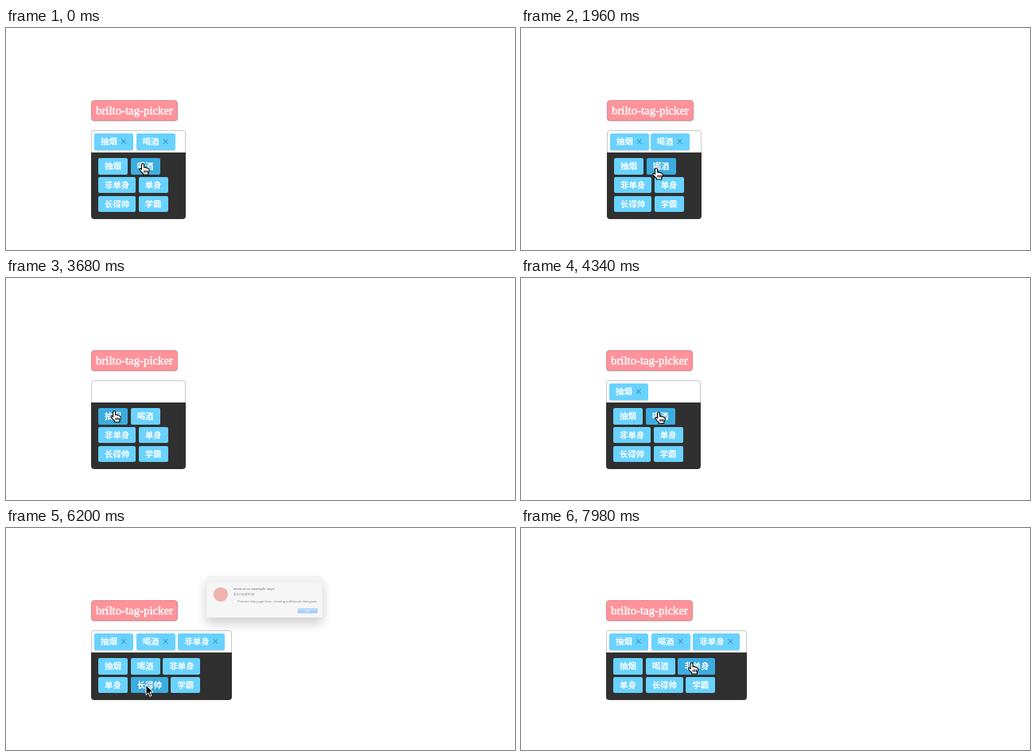
Animation, 640 px wide and 280 px high, one loop 8 s. Source, as an HTML page:

```html
<!DOCTYPE html>
<html lang="zh">
<head>
<meta charset="utf-8">
<title>Tag picker</title>
<style>
  * { box-sizing: border-box; }
  html, body { margin: 0; width: 100%; height: 100%; overflow: hidden; background: #fff; }
  #stage { position: relative; width: 640px; height: 280px; overflow: hidden; }
  #widget, #dialog, #pointer, #dialog > * { position: absolute; }
  #widget { left: 107px; top: 91px; }

  #heading {
    width: 109px; height: 26px; border: 1px solid #d98a92; border-radius: 4px;
    background: #ff929a; box-shadow: 0 1px 1px rgba(0, 0, 0, .2);
    color: #fff; font: 14.8px/25.5px "Liberation Serif", serif;
    -webkit-text-stroke: .45px #fff; text-align: center; white-space: nowrap;
  }
  #field {
    display: flex; gap: 3.7px; height: 29px; margin-top: 12px; padding: 3px;
    border: 1px solid #c9c9c9; border-radius: 3px 3px 0 0; background: #fff;
  }
  #menu {
    display: flex; flex-wrap: wrap; align-content: flex-start; gap: 3.2px 3.7px;
    margin-top: -1px; padding: 7.2px 9px 8.6px; border-radius: 0 0 4px 4px; background: #303030;
  }
  .chip {
    position: relative; height: 20.5px; padding-left: 8px; border-radius: 2px;
    background: #69d2ff; color: #fff; white-space: nowrap;
    font: 700 10.4px/19.6px "Noto Sans CJK SC", "Noto Sans CJK", sans-serif;
  }
  #field .chip { box-shadow: 0 1px 1px rgba(0, 0, 0, .15); }
  .chip.hot { background: #3cacdf; }
  .chip i {
    position: absolute; right: 8px; top: 0; color: #3b9dc8;
    font: 14px/20px "Liberation Sans", sans-serif;
  }
  .chip.hot i { color: #23607c; }

  #dialog {
    left: 140px; top: 22px; width: 370px; height: 131px; border-radius: 4px;
    background: #ececec;
    box-shadow: 0 0 1px rgba(0, 0, 0, .5), 0 17px 36px rgba(30, 8, 16, .5);
    color: #000; font: 10.4px/14px "Open Sans", sans-serif; white-space: nowrap;
  }
  #bar {
    left: 0; top: 0; width: 100%; height: 18.5px; border-radius: 4px 4px 0 0;
    border-bottom: 1px solid #c2bec1; background: linear-gradient(#ece7ea, #dcd7da);
  }
  #badge { left: 22px; top: 33px; width: 46px; height: 46px; border-radius: 50%; background: #dd4b3e; }
  #site { left: 85px; top: 31px; font-size: 10.8px; font-weight: 700; }
  #limit { left: 85px; top: 48.5px; font: 9px/14px "Noto Sans CJK TC", "Noto Sans CJK", sans-serif; }
  #box {
    left: 85px; top: 73px; width: 11px; height: 11px;
    border: 1px solid #b5b5b5; border-radius: 2px; background: #fff;
  }
  #prevent { left: 99.5px; top: 71.5px; -webkit-text-stroke: .15px #000; }
  #ok {
    left: 291px; top: 99.5px; width: 63.5px; height: 16.8px; border-radius: 3px;
    background: linear-gradient(#6bb5fb, #157efb); color: #fff; line-height: 16px; text-align: center;
  }
  #pointer { left: 0; top: 0; overflow: visible; }
</style>
</head>
<body>
<div id="stage">
  <div id="widget">
    <div id="heading">brilto-tag-picker</div>
    <div id="panel">
      <div id="field"></div>
      <div id="menu"></div>
    </div>
  </div>
  <div id="dialog">
    <div id="bar"></div>
    <div id="badge"></div>
    <div id="site">www.orvo.example says:</div>
    <div id="limit">最多只能選擇3個</div>
    <div id="box"></div>
    <div id="prevent">Prevent this page from creating additional dialogues.</div>
    <div id="ok">OK</div>
  </div>
  <svg id="pointer" width="16" height="18" stroke-linejoin="round">
    <path id="hand" fill="#fff" stroke="#000" stroke-width="1.1"
      d="M-1.5 1.5Q-1.5 0 0 0Q1.5 0 1.5 1.5V5Q3.5 4 4 5.5Q6 4.8 6.3 6.3Q8 6 8.2 8Q8.3 10.5 6.8 12V14H.3V12.5Q-2 10.5-4 8Q-4.5 6-2.8 6.2L-1.5 7.5ZM2 8.5V11.5M4 8.5V11.5M6 8.5V11.5"/>
    <path id="arrow" fill="#000" stroke="#fff" stroke-width="1"
      d="M0 0V12.5L2.9 9.8 4.9 14.3 6.9 13.4 5 9H9Z"/>
  </svg>
</div>
<script>
const LOOP = 8000;
const labels = ['抽烟', '喝酒', '非单身', '单身', '长得帅', '学霸'];
const $ = id => document.getElementById(id);
const clamp = v => Math.min(1, Math.max(0, v));
const within = (t, from, to) => t >= from && t < to;
const progress = (t, from, to) => clamp((t - from) / (to - from));

// Pointer tip: time, x, y
const path = [
  [0, 172, 171], [1000, 172, 171], [1700, 170, 177], [2300, 170, 177],
  [2750, 149, 142], [3300, 149, 142], [3800, 134, 172], [3950, 134, 172],
  [4250, 173, 169.5], [4450, 173, 169.5], [5000, 140, 192], [5250, 140, 192],
  [5800, 176, 198], [6300, 176, 198], [6850, 464.5, 122], [7130, 464.5, 122],
  [7850, 214.5, 170], [LOOP, 214.5, 170]
];

// Periods in which each tag is selected
const selected = [
  [[0, 3000], [3920, LOOP]],
  [[0, 3280], [4420, LOOP]],
  [[5200, LOOP]]
];

function addChip(parent, label, extra, close) {
  const chip = document.createElement('div');
  chip.className = 'chip';
  chip.textContent = label;
  chip.style.width = extra + label.length * 10 + 'px';
  if (close) chip.append(Object.assign(document.createElement('i'), { textContent: '×' }));
  parent.append(chip);
  return chip;
}

const tags = labels.slice(0, 3).map(s => addChip($('field'), s, 29, true));
const options = labels.map(s => addChip($('menu'), s, 17, false));
const chips = [...tags, ...options];

function pointerAt(t) {
  const i = path.findIndex(p => p[0] > t);
  const [t0, x0, y0] = path[i - 1], [t1, x1, y1] = path[i];
  const u = progress(t, t0, t1), e = u * u * (3 - 2 * u);
  return [x0 + (x1 - x0) * e, y0 + (y1 - y0) * e];
}

function chipAt(x, y) {
  return chips.find(chip => {
    const r = chip.getBoundingClientRect();
    return x >= r.left && x < r.right && y >= r.top && y < r.bottom;
  });
}

function render(t) {
  tags.forEach((tag, i) => {
    tag.style.display = selected[i].some(([a, b]) => within(t, a, b)) ? '' : 'none';
  });
  const wide = within(t, 5200, LOOP);
  $('panel').style.width = (wide ? 177 : 119) + 'px';
  $('widget').style.transform = within(t, 1060, 3500) ? 'translateX(1px)' : '';

  // Choosing a tag twice shakes it
  const shake = within(t, 1810, 2210) ? 2 * Math.sin((t - 1810) / 200 * 2 * Math.PI) : 0;
  tags[1].style.transform = `translateX(${shake}px)`;

  const [x, y] = pointerAt(t);
  const modal = within(t, 6050, 7200);
  const hot = modal ? options[4] : chipAt(x, y);
  chips.forEach(chip => chip.classList.toggle('hot', chip === hot));
  $('pointer').style.transform = `translate(${x}px, ${y}px)`;
  const pointing = hot && !modal;
  $('hand').style.display = pointing ? '' : 'none';
  $('arrow').style.display = pointing ? 'none' : '';

  const open = progress(t, 6140, 6300);
  const fade = 1 - progress(t, 7130, 7240);
  $('dialog').style.opacity = clamp(open * 1.1) * fade;
  $('dialog').style.transform = `scale(${.02 + .98 * open})`;
}

const start = performance.now();
function tick() {
  render((performance.now() - start) % LOOP);
  requestAnimationFrame(tick);
}
tick();
</script>
</body>
</html>
```
